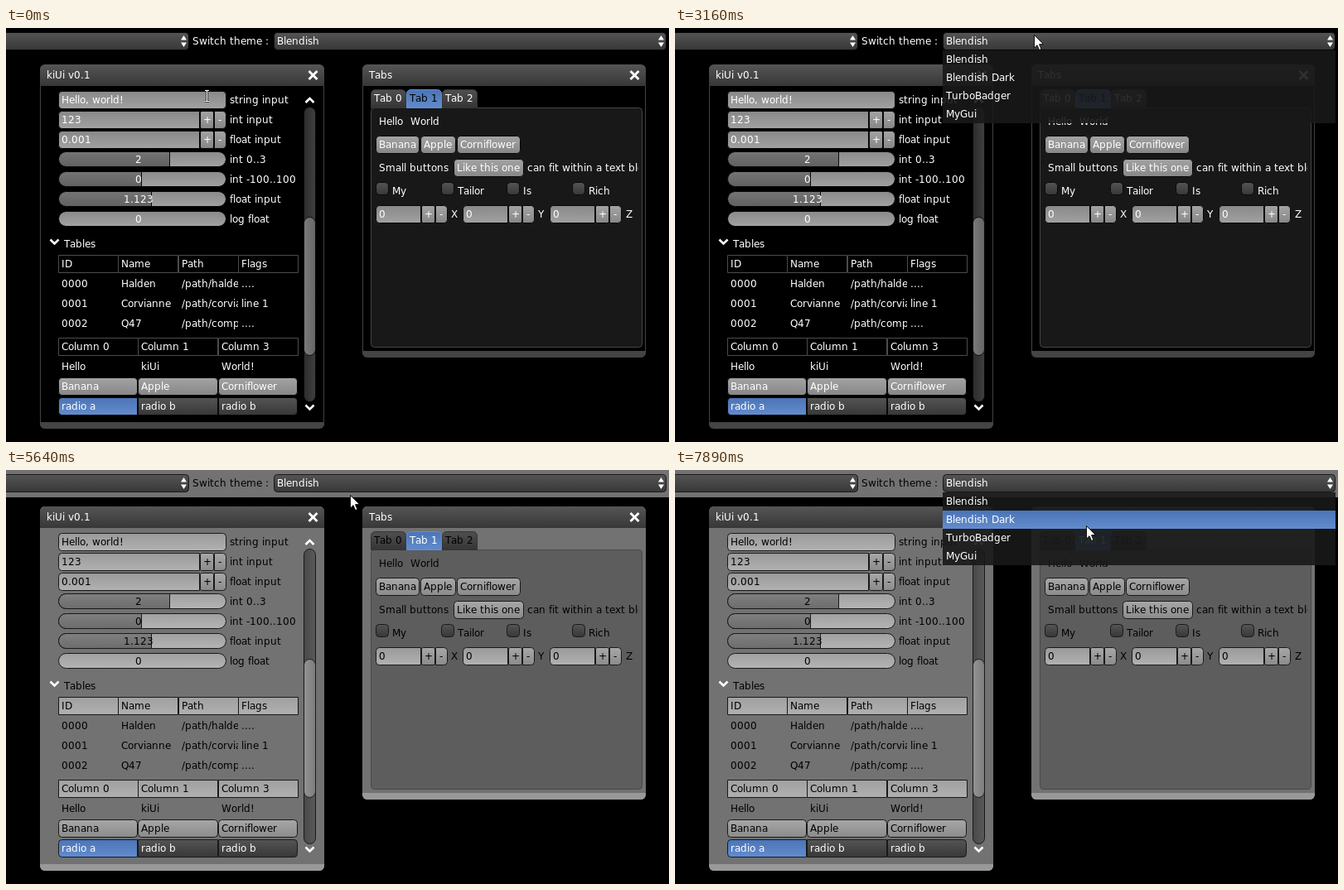
An HTML page with a canvas that plays this animation: 800x500 px, repeating every 8000 ms.

```html
<!DOCTYPE html>
<html>
<head>
<meta charset="utf-8">
<style>
html, body { margin: 0; width: 100%; height: 100%; overflow: hidden; background: #000; }
canvas { display: block; }
</style>
</head>
<body>
<canvas id="stage" width="800" height="500"></canvas>
<script>
const ctx = document.getElementById('stage').getContext('2d');
const LOOP = 8000;
const WHITE = '#fff', BLACK = '#000';
const BAR = ['#555', '#373737'], BLUE = ['#4a74b6', '#628cce'];

const DARK = {
  text: WHITE, tabOn: BLACK, edge: '#080808', body: BLACK, strip: '#444', frame: '#424242', bar: BLACK,
  panel: '#181818', panelEdge: '#454545', field: ['#888', '#a2a2a2'], button: ['#a4a4a4', '#868686'],
  done: ['#757575', '#606060'], rest: ['#8a8a8a', '#a2a2a2'], head: [BLACK, BLACK], headEdge: '#4c4c4c',
  track: ['#2c2c2c', '#404040'], thumb: ['#7c7c7c', '#646464']
};
const LIGHT = {
  text: BLACK, tabOn: WHITE, edge: '#191919', body: '#727272', strip: '#999', frame: '#727272', bar: '#727272',
  panel: '#5d5d5d', panelEdge: '#484848', field: ['#999', '#b2b2b2'], button: ['#a8a8a8', '#8a8a8a'],
  done: ['#808080', '#6c6c6c'], rest: ['#a0a0a0', '#b4b4b4'], head: ['#a0a0a0', '#b0b0b0'], headEdge: '#191919',
  track: ['#484848', '#5a5a5a'], thumb: ['#949494', '#7c7c7c']
};

// Pointer stops: time, x, y of the top left, 1 for the text beam
const POINTER = [
  [0, 239, 74, 1], [120, 243, 77, 1], [540, 243, 76, 1], [1100, 244, 76, 1], [1220, 243, 76, 1],
  [2060, 239, 82, 1], [2200, 190, 112], [2330, 148, 135], [2480, 408, 26], [2620, 433, 8],
  [3430, 428, 16], [3580, 420, 31], [3720, 415, 37], [3840, 412, 41], [5640, 415, 30],
  [5790, 416, 27], [5920, 416, 25], [6210, 479, 10], [6380, 485, 9], [6650, 502, 15],
  [7350, 501, 16], [7500, 500, 30], [7630, 499, 45], [7770, 498, 56], [7890, 496, 67]
];
// Drop-down states: time, highlighted row (-1 none, null closed)
const MENU = [[0, null], [3160, -1], [3430, 0], [4390, null], [7210, -1], [7500, 0], [7770, 1]];
const at = (steps, t) => steps.filter(s => s[0] <= t).pop();

let theme;
const widths = {};

// Whole-pixel advances, as in a hinted bitmap font
function text(str, x, y, color = theme.text) {
  ctx.fillStyle = color;
  for (const ch of str) {
    ctx.fillText(ch, x, y);
    x += widths[ch] ??= Math.round(ctx.measureText(ch).width);
  }
}

function ramp(colors, x0, y0, x1, y1) {
  const g = ctx.createLinearGradient(x0, y0, x1, y1);
  colors.forEach((c, i) => g.addColorStop(i, c));
  return g;
}

function box(x0, y0, x1, y1, colors, r = 4, edge = theme.edge, sideways = false) {
  ctx.beginPath();
  ctx.roundRect(x0 + .5, y0 + .5, x1 - x0 - 1, y1 - y0 - 1, r);
  ctx.fillStyle = sideways ? ramp(colors, x0, 0, x1, 0) : ramp(colors, 0, y0, 0, y1);
  ctx.fill();
  ctx.strokeStyle = edge;
  ctx.lineWidth = 1;
  ctx.stroke();
}

function rect(x0, y0, x1, y1, color) {
  ctx.fillStyle = color;
  ctx.fillRect(x0, y0, x1 - x0, y1 - y0);
}

function clipped(x0, y0, x1, y1, draw) {
  ctx.save();
  ctx.beginPath();
  ctx.rect(x0, y0, x1 - x0, y1 - y0);
  ctx.clip();
  draw();
  ctx.restore();
}

function line(color, width, ...pts) {
  ctx.beginPath();
  pts.forEach(([x, y]) => ctx.lineTo(x, y));
  ctx.strokeStyle = color;
  ctx.lineWidth = width;
  ctx.stroke();
}

function shape(color, ...pts) {
  ctx.beginPath();
  pts.forEach(([x, y]) => ctx.lineTo(x, y));
  ctx.closePath();
  ctx.fillStyle = color;
  ctx.fill();
}

const chevron = (x, y, d) => line(WHITE, 2.6, [x - 5, y - 2.5 * d], [x, y + 2.5 * d], [x + 5, y - 2.5 * d]);

function combo(x0, x1) {
  box(x0, 5, x1, 27, BAR);
  const x = x1 - 6.5;
  for (const d of [-1, 1]) shape(WHITE, [x - 3.5, 16 + 1.5 * d], [x + 3.5, 16 + 1.5 * d], [x, 16 + 7 * d]);
}

function frame(x0, y0, x1, y1, title) {
  ctx.save();
  ctx.beginPath();
  ctx.roundRect(x0, y0, x1 - x0, y1 - y0, 6);
  ctx.clip();
  rect(x0, y0, x1, y1, theme.frame);
  rect(x0 + 1, y0, x1 - 1, y1, theme.body);
  rect(x0, y0, x1, 70, ramp(BAR, 0, y0, 0, 70));
  rect(x0, y1 - 8, x1, y1, theme.strip);
  ctx.restore();
  text(title, x0 + 8, 61, WHITE);
  const x = x1 - 13.5;
  line(WHITE, 2.8, [x - 5, 52], [x + 5, 62]);
  line(WHITE, 2.8, [x + 5, 52], [x - 5, 62]);
}

function button(x0, y0, x1, label) {
  box(x0, y0, x1, y0 + 22, theme.button);
  text(label, x0 + 4, y0 + 15);
}

function spinner(x0, a, b, x1, y, value) {
  box(x0, y, a, y + 22, theme.field, [4, 0, 0, 4]);
  box(a, y, b, y + 22, theme.button, 2);
  box(b, y, x1, y + 22, theme.button, [0, 4, 4, 0]);
  text(value, x0 + 4, y + 15);
  text('+', a + 4, y + 15);
  text('-', b + 5, y + 15);
}

function slider(y, split, value, x, label) {
  box(63, y, 266, y + 19, theme.rest, 9.5);
  if (split) {
    clipped(63, y, split, y + 19, () => box(63, y, 266, y + 19, theme.done, 9.5));
    rect(split - 1, y + 1, split, y + 18, theme.edge);
  }
  text(value, x, y + 14);
  text(label, 270, y + 14);
}

function mainWindow() {
  frame(41, 44, 384, 484, 'kiUi v0.1');
  box(63, 76, 266, 98, theme.field);
  text('Hello, world!', 67, 91);
  spinner(63, 234, 251, 266, 100, '123');
  spinner(63, 234, 251, 266, 124, '0.001');
  ['string input', 'int input', 'float input'].forEach((s, i) => text(s, 270, 91 + 24 * i));
  slider(149, 198, '2', 156, 'int 0..3');
  slider(173, 164, '0', 156, 'int -100..100');
  slider(197, 176, '1.123', 142, 'float input');
  slider(221, 0, '0', 156, 'log float');

  chevron(366.5, 87.5, -1);
  chevron(366.5, 458, 1);
  box(359, 95, 374, 452, theme.track, 7, theme.edge, true);
  box(359, 228, 374, 396, theme.thumb, 7, theme.edge, true);

  chevron(58.5, 258, 1);
  text('Tables', 70, 265);
  const cols = [63, 135, 208, 280], ends = [136, 208, 281, 353];
  const rows = [
    ['ID', 'Name', 'Path', 'Flags'],
    ['0000', 'Halden', '/path/halden', '....'],
    ['0001', 'Corvianne', '/path/corvianne', 'line 1'],
    ['0002', 'Q47', '/path/computer', '....']
  ];
  rows.forEach((row, j) => row.forEach((s, i) => {
    if (!j) box(cols[i], 274, ends[i], 296, theme.head, 0, theme.headEdge);
    clipped(cols[i], 274, ends[i] - 1, 372, () => text(s, cols[i] + 4, 289 + 24 * j));
  }));

  [63, 159, 256].forEach((x, i) => {
    const end = [159, 256, 352][i];
    box(x, 374, end + (i == 1 ? 0 : 1), 396, theme.head, 0, theme.headEdge);
    text(['Column 0', 'Column 1', 'Column 3'][i], x + 4, 389);
    text(['Hello', 'kiUi', 'World!'][i], x + 4, 413);
    button(x, 422, end, ['Banana', 'Apple', 'Corniflower'][i]);
    box(x, 446, end, 468, i ? BAR : BLUE, [[4, 0, 0, 4], 0, [0, 4, 4, 0]][i]);
    text(['radio a', 'radio b', 'radio b'][i], x + 4, 461, WHITE);
  });
}

function tabWindow() {
  frame(430, 44, 772, 398, 'Tabs');
  box(440, 96, 768, 386, [theme.panel, theme.panel], 4, theme.panelEdge);
  for (let i = 0; i < 3; i++) {
    const x = 440 + 43 * i, on = i == 1, fill = on ? BLUE : ['#505050', '#343434'];
    box(x, 74, x + 43, 97, fill, [5, 5, 0, 0], fill[1]);
    text('Tab ' + i, x + 4, 89, on ? theme.tabOn : theme.text);
  }
  text('Hello', 450, 117);
  text('World', 488, 117);
  button(446, 130, 499, 'Banana');
  button(500, 130, 543, 'Apple');
  button(544, 130, 621, 'Corniflower');
  text('Small buttons', 450, 173);
  button(540, 158, 625, 'Like this one');
  clipped(440, 150, 763, 190, () => text('can fit within a text block', 629, 173));
  ['My', 'Tailor', 'Is', 'Rich'].forEach((s, i) => {
    const x = 446 + 79 * i;
    box(x, 186, x + 16, 202, BAR);
    text(s, x + 20, 201);
  });
  ['X', 'Y', 'Z'].forEach((s, i) => {
    const x = 446 + 105 * i;
    spinner(x, x + 55, x + 72, x + 87, 214, '0');
    text(s, x + 91 + (i > 1), 229);
  });
}

function menu(row) {
  rect(323, 27, 797, 115, 'rgba(25,25,25,.9)');
  ['Blendish', 'Blendish Dark', 'TurboBadger', 'MyGui'].forEach((s, i) => {
    const y = 27 + 22 * i;
    if (i == row) rect(323, y, 797, y + 22, ramp(BLUE, 0, y, 0, y + 22));
    text(s, 327, y + 15, WHITE);
  });
}

function pointer([, x, y, beam]) {
  ctx.save();
  ctx.translate(x, y);
  if (beam) {
    for (const [color, w] of [['#222', 2.4], [WHITE, 1]]) {
      line(color, w, [3.5, 1], [3.5, 15]);
      line(color, w, [1, 1.5], [6, 1.5]);
      line(color, w, [1, 14.5], [6, 14.5]);
    }
  } else {
    shape(WHITE, [.5, .5], [.5, 16], [4, 12.7], [6.6, 18.5], [9, 17.5], [6.5, 11.7], [11.5, 11.5]);
    ctx.strokeStyle = '#111';
    ctx.lineWidth = 1;
    ctx.stroke();
  }
  ctx.restore();
}

function draw(now) {
  const t = now % LOOP;
  theme = t < 4390 ? DARK : LIGHT;
  ctx.font = '12px "DejaVu Sans", sans-serif';
  rect(0, 0, 800, 500, BLACK);
  rect(0, 0, 800, 33, theme.bar);
  combo(-20, 221);
  text('Switch theme :', 225, 20);
  combo(323, 797);
  text('Blendish', 327, 20, WHITE);
  mainWindow();
  tabWindow();
  const row = at(MENU, t)[1];
  if (row !== null) menu(row);
  pointer(at(POINTER, t));
}

let start;
function tick(now) {
  start ??= now;
  draw(now - start);
  requestAnimationFrame(tick);
}
requestAnimationFrame(tick);
</script>
</body>
</html>
```
